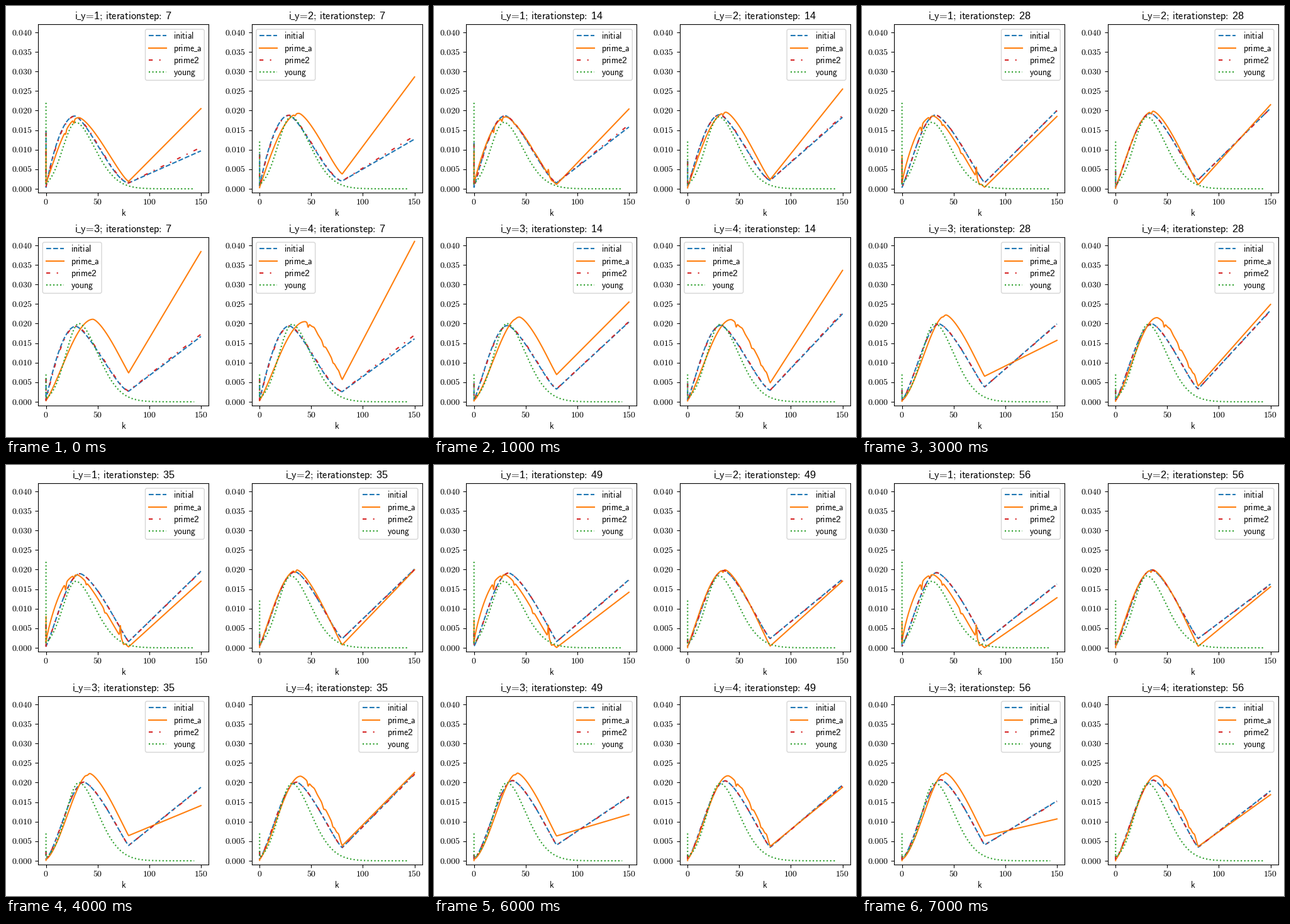
These frames come from a looping animation (671 by 686 pixels, 8000 ms). A matplotlib script:

```python
import numpy as np
import matplotlib.pyplot as plt
from matplotlib.animation import FuncAnimation
from matplotlib.lines import Line2D
from matplotlib.patches import FancyBboxPatch
from matplotlib.transforms import Affine2D

plt.rcParams["mathtext.fontset"] = "cm"
plt.rcParams["font.family"] = "Liberation Sans"

W, H, DPI = 671, 686, 100
AX_W, AX_H = 270.95, 267.7
LEFTS, TOPS = (51.3, 390.95), (29.5, 368.5)
EM = 10 * DPI / 72
LEGEND_W, LEGEND_H = 93.8, 81.2
STEPS = 8
KNEE, TIP = 80, 150
X = np.linspace(0, KNEE, 321)
TIP_STEPS = np.array([0, 1, 2, 3, 7])

BAR = r"\hspace{-.09}\_\hspace{-.09}"
STYLES = {
    "initial": ("C0", "--"),
    "prime" + BAR + "a": ("C1", "-"),
    r"prime\mathregular{2}": ("C3", (0, (3, 5, 1, 5))),
    "young": ("C2", ":"),
}

# early and late: peak place, peak height, rise power, fall power, knee height
# tip: height of the right end at TIP_STEPS; heights in units of 1e-4
INITIAL = [
    dict(early=(28, 186, .87, 1.7, 15), late=(34, 192, 1.18, 1.05, 16),
         tip=(97, 158, 190, 200, 163), spike=148),
    dict(early=(28.5, 188, .88, 1.7, 20), late=(35.5, 199, 1.18, 1.2, 24),
         tip=(127, 183, 202, 206, 163), spike=90),
    dict(early=(29, 193, .92, 1.5, 27), late=(38, 207, 1.4, 1.1, 41),
         tip=(167, 204, 209, 199, 153), spike=60),
    dict(early=(29, 194, .95, 1.64, 26), late=(37, 206, 1.28, 1.2, 35),
         tip=(161, 225, 241, 234, 179), spike=60),
]

# bumps: place, early height, late height, width
PRIME_A = [
    dict(early=(32, 182, 1.03, 1.3, 19), late=(30, 187, .8, 1.3, 0),
         tip=(205, 204, 202, 185, 128), spike=102, decay=.94, start=14,
         bumps=[(19, -8, -18, .7), (27, -9, -7, .7), (39, 0, -7, .7),
                (57, 0, -7, 1), (72, 0, 32, .6), (75, 0, -9, 1.2)]),
    dict(early=(38, 193, 1, 1.3, 38), late=(36, 200, 1.08, 1.1, 3),
         tip=(286, 255, 233, 215, 156), bumps=[(34.3, -4, -6, 1)]),
    dict(early=(45.5, 211, 1.21, 1.1, 74), late=(42, 225, 1.52, 1.1, 63),
         tip=(384, 255, 193, 157, 107), bumps=[(40, 0, -3, 1.3)]),
    dict(early=(44, 205, 1.16, 1.05, 57), late=(39, 218, 1.32, 1, 36),
         tip=(410, 336, 285, 249, 169),
         bumps=[(47, -10, -10, .8), (53, 5, 4, 2), (62, -7, -8, 1.3),
                (71, -5, -6, 1), (76.5, 4, 8, 1.5)]),
]

# peak place, peak height, height of the mass at k = 0
YOUNG = [(29, 170, 220), (30.5, 184, 121), (32, 200, 70), (31.5, 198, 70)]

# step from which each legend sits in the right corner
RIGHT_FROM = (0, 1, 1, 3)


def smooth(k, y, x):
    """Monotone cubic curve through the points (k, y)."""
    y = np.array(y)
    h = np.diff(k)
    d = np.diff(y) / h
    ab = d[:-1] * d[1:]
    inner = np.where(ab > 0, 2 * ab / np.where(ab > 0, d[:-1] + d[1:], 1), 0)
    m = np.concatenate([d[:1], inner, d[-1:]])
    i = np.clip(np.searchsorted(k, x) - 1, 0, len(h) - 1)
    t = (x - k[i]) / h[i]
    return (y[i] * (1 + 2 * t) * (1 - t) ** 2 + y[i + 1] * t * t * (3 - 2 * t)
            + h[i] * t * (1 - t) * (m[i] * (1 - t) - m[i + 1] * t))


def hump(place, peak, rise, fall, knee, start):
    up = np.sin(np.pi / 2 * np.minimum(X / place, 1) ** rise)
    u = np.clip((X - place) / (KNEE - place), 0, 1)
    down = (1 - u ** 1.45) ** fall
    return np.where(X < place, start + (peak - start) * up,
                    knee + (peak - knee) * down)


def curve(c, s, growth):
    """Curve at step s; growth is the progress of the peak's height."""
    progress = 1 - .6 ** s
    early, late = np.array(c["early"]), np.array(c["late"])
    shape = early + (late - early) * progress
    shape[1] = early[1] + (late[1] - early[1]) * growth
    y = hump(*shape, c.get("start", 4))
    for place, h0, h1, width in c.get("bumps", []):
        y += (h0 + (h1 - h0) * progress) * np.exp(-((X - place) / width) ** 2)
    spike = c.get("spike", 3) * c.get("decay", .8) ** s
    tip = smooth(TIP_STEPS, c["tip"], s)
    return (np.concatenate([[0], X, [TIP]]),
            np.concatenate([[spike], np.maximum(y, 0), [tip]]) / 1e4)


def young_curve(place, peak, mass):
    x = np.linspace(0, 143.5, 288)
    d = x - place
    y = peak * np.where(d < 0, np.exp(-(d / 18.1) ** 2),
                        np.exp(-(abs(d) / 27) ** 1.8))
    return np.append(0, x), np.append(mass, y) / 1e4


fig = plt.figure(figsize=((W + 1e-6) / DPI, (H + 1e-6) / DPI), dpi=DPI,
                 facecolor="white")
px = Affine2D().scale(1 / W, -1 / H).translate(0, 1) + fig.transFigure


def put(x, y, text, ha="center", size=10):
    return fig.text(x, y, f"${text}$", transform=px, ha=ha, va="baseline",
                    fontsize=size)


def sans(text):
    return r"\mathsf{" + text + "}"


def title_text(n, step):
    digits = r"\mathregular{%d}"
    return sans("i" + BAR + r"y\hspace{-.2}=\hspace{-.2}" + digits % n
                + r";\hspace{.18}iterationstep\hspace{-.2}:\hspace{.26}"
                + digits % step)


def add_legend(x, y):
    box = FancyBboxPatch((x, y), LEGEND_W, LEGEND_H, transform=px, fc="white",
                         ec="0.8", lw=1, alpha=.8,
                         boxstyle=f"round,pad=0,rounding_size={.2 * EM}")
    parts = [fig.add_artist(box)]
    x += .4 * EM
    for i, (name, (color, style)) in enumerate(STYLES.items()):
        base = y + 15.2 + 19.35 * i
        line = Line2D([x, x + 2 * EM], [base - 4.86] * 2, transform=px,
                      color=color, ls=style, lw=1.5)
        parts += [fig.add_artist(line),
                  put(x + 2.8 * EM, base, sans(name), ha="left")]
    return parts


class Panel:
    def __init__(self, n):
        self.n = n
        left, top = LEFTS[n % 2], TOPS[n // 2]
        bottom = top + AX_H
        ax = fig.add_axes([left / W, 1 - bottom / H, AX_W / W, AX_H / H])
        ax.set(xlim=(-7.5, 157.5), ylim=(-.001, .042),
               xticks=[0, 50, 100, 150], yticks=np.arange(9) * .005)
        ax.tick_params(labelbottom=False, labelleft=False)
        for v in (0, 50, 100, 150):
            put(left + (v + 7.5) / 165 * AX_W, bottom + 19, str(v))
        for v in np.arange(9) * .005:
            put(left - 9.7, top + (.042 - v) / .043 * AX_H + 4.6, f"{v:.3f}",
                ha="right")
        mid = left + AX_W / 2
        put(mid, bottom + 36.6, sans("k"))
        self.title = put(mid, top - 8.3, title_text(n + 1, 7), size=11.75)
        self.lines = [ax.plot([], [], color=c, ls=s, lw=1.5)[0]
                      for c, s in STYLES.values()]
        self.lines[3].set_data(*young_curve(*YOUNG[n]))
        pad = .5 * EM
        self.legends = [add_legend(x, top + pad + .6) for x in
                        (left + pad, left + AX_W - pad - LEGEND_W)]

    def update(self, s):
        n = self.n
        self.title.set_text(f"${title_text(n + 1, 7 * (s + 1))}$")
        self.lines[0].set_data(*curve(INITIAL[n], s, s / 7))
        self.lines[1].set_data(*curve(PRIME_A[n], s, 1 - .6 ** s))
        # prime2 is the initial curve one iteration later
        ahead = s + 1 / 7
        self.lines[2].set_data(*curve(INITIAL[n], ahead, ahead / 7))
        side = int(s >= RIGHT_FROM[n])
        for i, parts in enumerate(self.legends):
            for part in parts:
                part.set_visible(i == side)


panels = [Panel(n) for n in range(4)]


def draw(s):
    for panel in panels:
        panel.update(s)
    return []


anim = FuncAnimation(fig, draw, frames=STEPS, interval=1000, repeat=True,
                     init_func=lambda: draw(0), blit=False)
plt.show()
```
